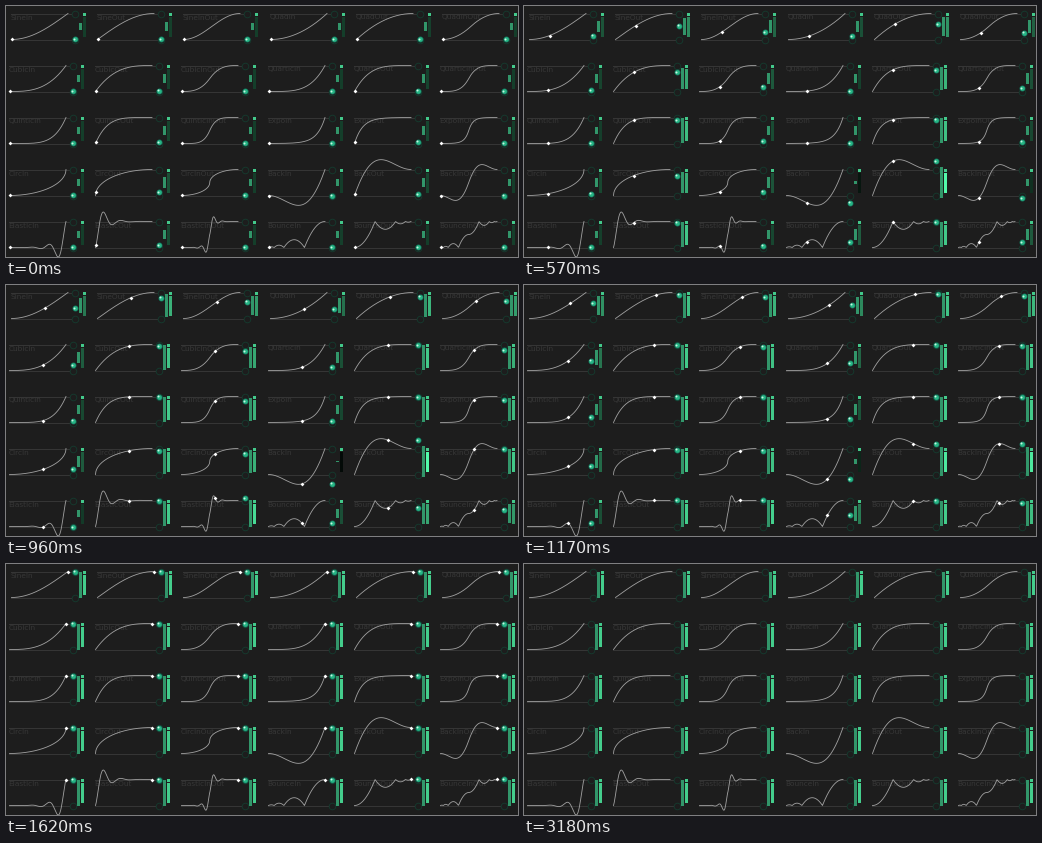
A matplotlib script for the animation above (3210 ms loop, 512x251 px).

```python
import numpy as np
import matplotlib.pyplot as plt
from matplotlib.animation import FuncAnimation
from matplotlib.patches import Rectangle

WIDTH, HEIGHT, DPI = 512, 251, 64
PT = 72 / DPI                      # points per pixel
STEP, FRAMES = 30, 107
MOVE_END, HOLD_END = 1620, 2400
DOT_GONE, BALL_GONE = 2900, 3180
SPAN, RISE = 56.5, 26              # plot size in pixels
COLUMNS = [3, 89, 175, 262, 348, 434]
BRIGHT = np.array([68, 205, 140]) / 255


def circ(t):
    return 1 - np.sqrt(1 - t * t)


def expo(t):
    return 0 if t <= 0 else 2 ** (10 * (t - 1))


def back(t):
    return t ** 3 - t * np.sin(np.pi * t)


def elastic(t):
    return np.sin(6.5 * np.pi * t) * 2 ** (10 * (t - 1))


def bounce(t):
    u = 1 - t
    if u < 4 / 11:
        v = 121 * u * u / 16
    elif u < 8 / 11:
        v = 9.075 * u * u - 9.9 * u + 3.4
    elif u < 0.9:
        v = (4356 * u * u - 7088.4 * u + 3212.2) / 361
    else:
        v = 10.8 * u * u - 20.52 * u + 10.72
    return 1 - v


def power(n):
    return lambda t: t ** n


def ease_out(f):
    return lambda t: 1 - f(1 - t)


def ease_in_out(f):
    return lambda t: f(2 * t) / 2 if t < 0.5 else 1 - f(2 - 2 * t) / 2


FAMILIES = [
    ("Sine", lambda t: 1 - np.cos(t * np.pi / 2)), ("Quad", power(2)),
    ("Cubic", power(3)), ("Quartic", power(4)),
    ("Quintic", power(5)), ("Expo", expo),
    ("Circ", circ), ("Back", back),
    ("Elastic", elastic), ("Bounce", bounce),
]

fig = plt.figure(figsize=(WIDTH / DPI, HEIGHT / DPI), dpi=DPI, facecolor="#1d1d1d")
ax = fig.add_axes([0, 0, 1, 1])
ax.set_xlim(0, WIDTH)
ax.set_ylim(HEIGHT, 0)
ax.axis("off")


def markers(shape, size, color, z, **kw):
    return ax.plot([], [], shape, ms=size * PT, color=color, mew=0, zorder=z, **kw)[0]


def add_bar(x, y, h, color):
    return ax.add_patch(Rectangle((x, y), 3, h, fc=color, lw=0, zorder=3))


class Cell:
    """One easing plot with its slider, scaling bar and shading bar."""

    def __init__(self, name, ease, row, col):
        self.ease = ease
        self.x = COLUMNS[col] + (2 if row == 0 else 0)
        self.top = 7.5 + 52 * row
        self.base = self.top + RISE
        x, top = self.x, self.top
        ax.text(x - 0.5, top + 6, name, color="#373737", family="DejaVu Sans",
                size=7.4 * PT, va="baseline", zorder=1)
        for y in (top, self.base):
            ax.plot([x, x + 60], [y, y], color="#353535", lw=PT, zorder=1)
            ax.plot(x + 63.5, y, "o", ms=6.6 * PT, mfc="none", mec="#153a2e",
                    mew=0.9 * PT, zorder=2)
        ts = np.linspace(0, 1, 160)
        ax.plot(x + 0.5 + SPAN * ts, [self.base - RISE * ease(t) for t in ts],
                color="#a0a0a0", lw=0.85 * PT, zorder=3)
        add_bar(x + 72, top - 0.5, 3, "#43c98b")
        self.scaled = add_bar(x + 68, top, RISE, "#32966a")
        self.shaded = add_bar(x + 72, top + 3.5, 20, BRIGHT)

    def update(self, t):
        v = self.ease(t)
        level = 0.3 + 0.7 * v
        h = RISE * max(level, 0.02)
        self.scaled.set_y(self.top + RISE / 2 - h / 2)
        self.scaled.set_height(h)
        self.shaded.set_facecolor(np.clip(BRIGHT * level, 0, 1))
        y = self.base - RISE * v
        return self.x + 0.5 + SPAN * t, self.x + 63.5, y


cells = []
for k, (name, f) in enumerate(FAMILIES):
    row, first = k // 2, 3 * (k % 2)
    variants = [("In", f), ("Out", ease_out(f)), ("InOut", ease_in_out(f))]
    for j, (suffix, ease) in enumerate(variants):
        cells.append(Cell(name + suffix, ease, row, first + j))

dots = markers("D", 2.7, "white", 6)
rim = markers("o", 6, "#14705a", 4)
body = markers("o", 4.6, "#27b685", 5)
shine = markers("o", 2, "#c8f5e2", 6)


def fade(ms, end):
    return float(np.clip((end - ms) / (end - HOLD_END), 0, 1))


def draw(i):
    ms = i * STEP
    t = min((ms + 15) / (MOVE_END + 15), 1)
    dot_x, ball_x, y = np.array([c.update(t) for c in cells]).T
    dots.set_data(dot_x, y)
    dots.set_alpha(fade(ms, DOT_GONE))
    for part, shift in ((rim, 0), (body, 0), (shine, -0.4)):
        part.set_data(ball_x + shift, y + shift)
        part.set_alpha(fade(ms, BALL_GONE))
    return []


anim = FuncAnimation(fig, draw, frames=FRAMES, interval=STEP, repeat=True,
                     repeat_delay=0, blit=False)
plt.show()
```
